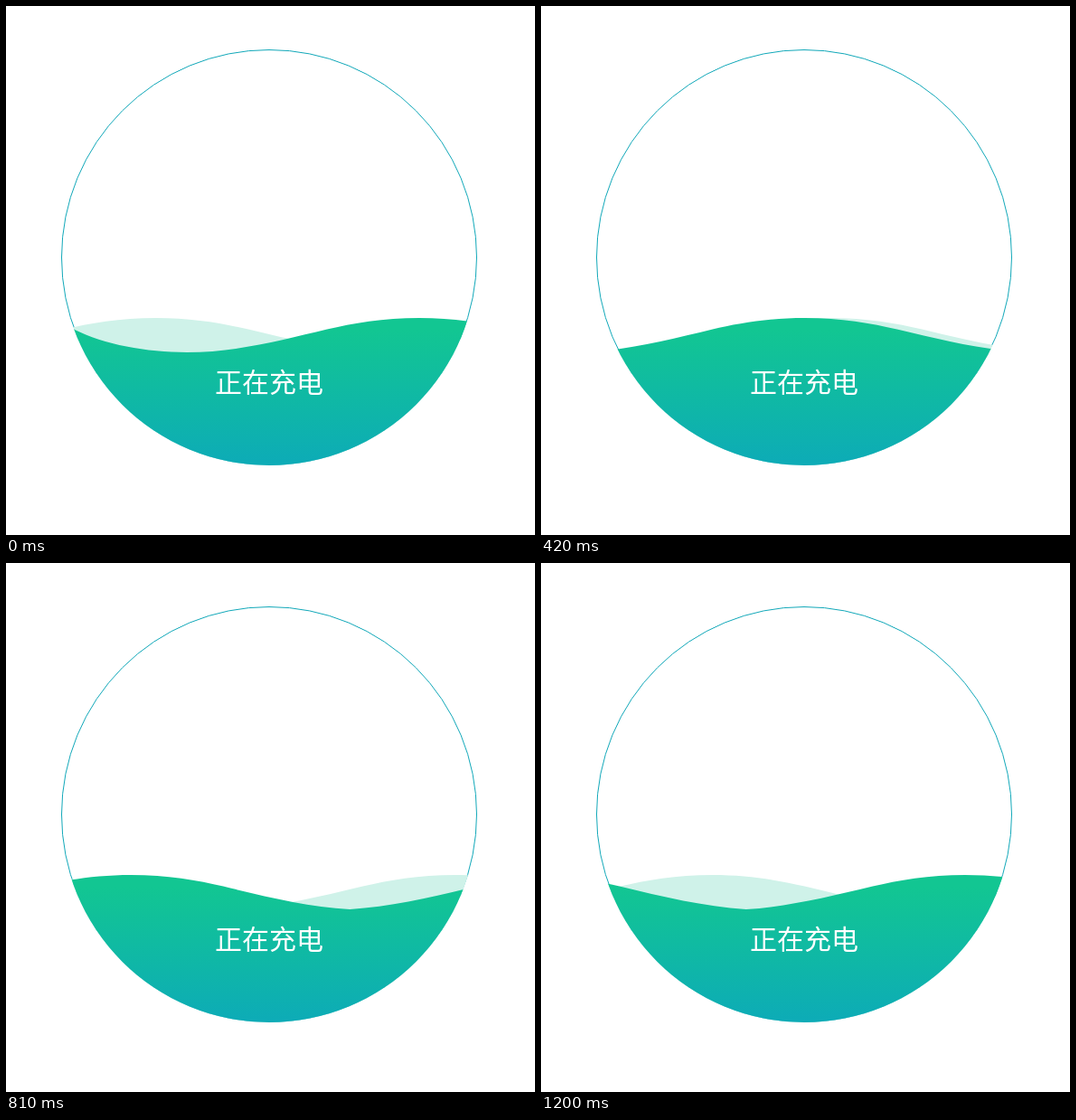
An HTML page that plays this animation: 585x585 px, repeating every 1.23 s.

```html
<!DOCTYPE html>
<html lang="zh-CN">
<head>
<meta charset="utf-8">
<style>
  html, body { margin: 0; width: 100%; height: 100%; overflow: hidden; background: #fff; }
  svg { display: block; width: 100vw; height: 100vh; }
  text { font: 30px "Noto Sans CJK SC", "Noto Sans CJK", sans-serif; fill: #fff; text-anchor: middle; }
</style>
</head>
<body>
<svg viewBox="0 0 585 585">
  <defs>
    <linearGradient id="water" gradientUnits="userSpaceOnUse" x1="0" y1="345" x2="0" y2="508">
      <stop offset="0.08" stop-color="#12c692"/>
      <stop offset="1" stop-color="#0dabb7"/>
    </linearGradient>
    <clipPath id="bowl"><circle cx="291" cy="278" r="230"/></clipPath>
  </defs>
  <circle cx="291" cy="278" r="229.5" fill="none" stroke="#11a8b9"/>
  <g clip-path="url(#bowl)">
    <path id="back" fill="#cff2e9"/>
    <path id="front" fill="url(#water)"/>
  </g>
  <text x="291" y="427">正在充电</text>
</svg>
<script>
  const LOOP = 1230, STEP = 30, PERIOD = 484, CREST = 345;
  const back = document.getElementById('back');
  const front = document.getElementById('front');

  // One period, crest to crest: down to the trough and up again.
  const fall = 'c40 0 74 6 102 12.6';
  const rise = 'c28 -6.6 62 -12.6 102 -12.6';
  const trough = 'c48 11.5 93 22.5 140 25.4 c47 -2.9 92 -13.9 140 -25.4';
  const softTrough = 'c34 17 80 25.4 125 25.4 c55 0 107 -13.9 155 -25.4';
  const wave = fall + trough + rise;
  const softWave = fall + softTrough + rise;

  const fillBelow = (x, waves) => `M${x} ${CREST}${waves}V520H${x}z`;
  back.setAttribute('d', fillBelow(166 - PERIOD, wave.repeat(4)));
  front.setAttribute('d', fillBelow(457 - PERIOD, softWave + wave.repeat(2)));

  function draw(now) {
    const time = Math.floor(now % LOOP / STEP) * STEP;
    const shift = PERIOD * time / LOOP;
    front.setAttribute('transform', `translate(${-shift})`);
    back.setAttribute('transform', `translate(${-2 * shift})`);
  }

  const start = performance.now();
  function tick() {
    draw(performance.now() - start);
    requestAnimationFrame(tick);
  }
  tick();
</script>
</body>
</html>
```
